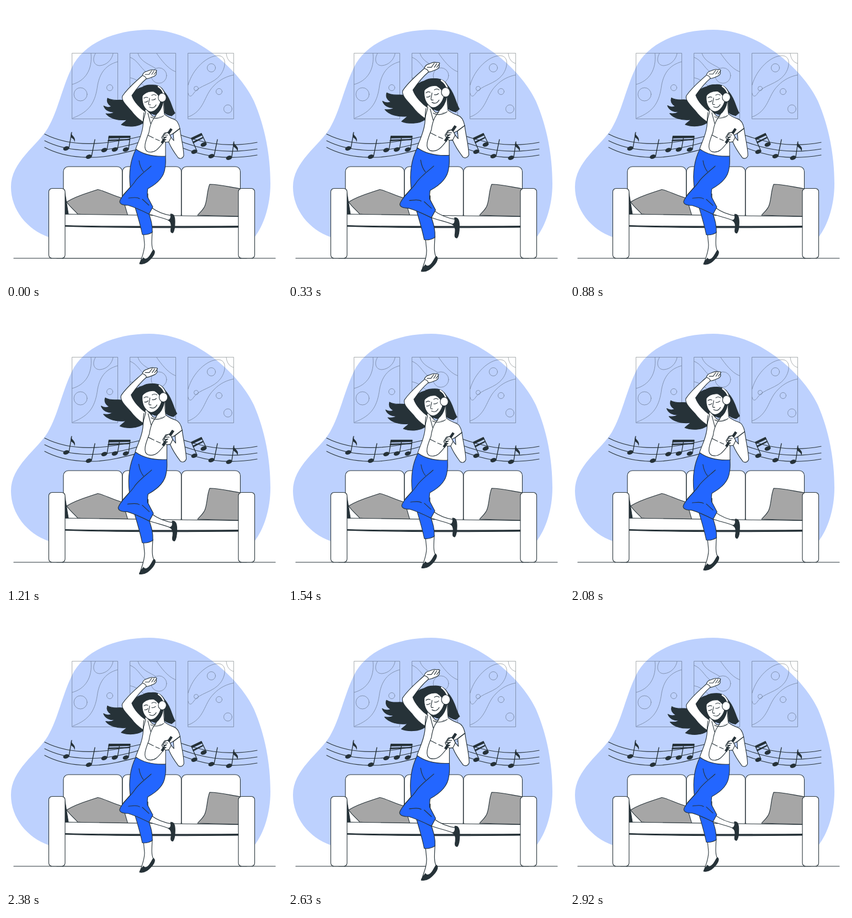
Animation of 500 by 500 pixels, one loop 2.96 s. Source, as an HTML page:

```html
<!DOCTYPE html>
<html lang="en">
<head>
<meta charset="utf-8">
<title>Dancing at home</title>
<style>
  html, body { margin: 0; height: 100%; overflow: hidden; background: #fff; }
  svg { display: block; width: 100%; height: 100%; }
  .line { fill: none; stroke: #263238; stroke-width: 1.1; stroke-linecap: round; stroke-linejoin: round; }
  .white { fill: #fff; }
  .dark { fill: #263238; }
  .blue { fill: #2366ff; }
  .grey { fill: #a6a6a6; }
  .art { stroke-width: .8; opacity: .5; }
</style>
</head>
<body>
<svg viewBox="0 0 500 500">
  <path fill="#bdd1fe" d="M260 43C196 43 140 68 119 112C101 150 94 190 76 221C56 254 9 282 9 328C9 369 38 405 78 419H450C467 398 479 361 479 322C479 270 469 218 449 172C427 123 348 43 260 43Z"/>

  <g class="line art">
    <path d="M120 85.500H202.500V204.500H120ZM225 85.500H307.500V204.500H225ZM330 85.500H412.500V204.500H330Z"/>
    <path d="M154 86C157 116 143 136 120 142M162 86C155 98 160 108 170 108C183 107 192 97 194 86M202 101C180 107 170 122 166 143C162 173 153 191 121 203"/>
    <circle cx="135" cy="160" r="12"/><circle cx="188" cy="148" r="5.500"/>
    <path d="M225 93C238 98 243 111 253 119M239 86C244 102 263 107 271 113M273 86C280 96 293 114 307 119M225 130C243 133 252 150 270 160S298 190 307 194"/>
    <circle cx="277" cy="126" r="14"/>
    <path d="M330 143C338 114 364 90 384 90C400 90 399 110 389 124C376 142 350 143 340 158C335 166 331 164 330 158M399 86C400 96 405 102 412 104M330 201C360 190 358 163 376 145C388 132 402 127 412 125"/>
    <circle cx="372" cy="112" r="7.500"/><circle cx="344.500" cy="149.500" r="4"/><circle cx="386" cy="155" r="5.500"/><circle cx="402" cy="186.500" r="7.500"/>
  </g>

  <g class="line">
    <path d="M70 232C113 254 164 251 200 245S234 238 250 235M70 244C111 265 164 264 200 257S234 249 250 244M70 256C111 278 164 277 200 269S234 261 250 255"/>
    <path d="M306 230C350 247 397 258 455 247M308 242C352 260 397 269 455 259M312 254C354 272 397 280 455 270"/>
    <path stroke-width="1.400" d="M114 257L119 229M155 272L161 242M183 260L187 236M202 259L206 236M222 259L225 236M346 263L336 240M363 250L354 231M377 271L383 242M409 273L413 246"/>
  </g>
  <g class="dark">
    <path d="M118 228C118 236 128 237 124 247C124 240 119 240 117 237ZM412 245C413 253 424 254 419 264C419 257 413 257 411 253ZM186 235L225 235V239L185 240ZM185 242L224 241V243L184 245ZM335 239L354 230L356 234L337 243ZM338 246L357 237L358 239L339 249Z"/>
    <g id="heads"></g>
  </g>

  <path class="line" d="M14 457H488"/>
  <g class="line">
    <path class="white" d="M92 370H436V457H92Z"/>
    <rect class="white" x="104" y="291" width="106.500" height="95" rx="9"/>
    <rect class="white" x="211" y="291" width="106.500" height="95" rx="9"/>
    <rect class="white" x="318" y="291" width="106.500" height="95" rx="9"/>
    <path class="dark" d="M106 333L113 377H106Z"/>
    <path class="grey" d="M110 355C129 343 148 339 166 332.500C171 332 193 343 210 348C215 356 217 369 221 380C184 382 150 379 130 377C123 369 115 363 110 355Z"/>
    <path class="grey" d="M369 323C387 323 405 328 424 331V381L347 379C353 372 359 368 361 360C365 348 364 335 369 323Z"/>
    <path class="white" d="M106 377L422 381.500V399H106Z"/>
    <path class="dark" d="M106 397.500C185 400 330 400 422 398.500V401C330 402 186 402 106 399Z"/>
    <rect class="white" x="77.500" y="330.500" width="29.500" height="126.500" rx="6"/>
    <rect class="white" x="421" y="330.500" width="29.500" height="126.500" rx="6"/>
  </g>

  <g id="girl" class="line">
    <!-- hair behind -->
    <path class="dark" d="M247 147C260 139 279 144 289 158C299 171 300 184 306 194L300 199C293 198 288 195 283 190L252 198L249 211C239 220 219 219 209 215C213 211 217 209 219 206C204 208 188 204 181 195C188 196 193 195 197 192C188 193 180 189 177 181C182 184 187 184 191 182C184 178 182 173 184 167C194 173 204 169 214 171L226 161C232 154 239 149 247 147Z"/>
    <!-- standing leg -->
    <path class="white" d="M249 411L251 432C251 443 248 450 244 462L255 462L267 443C263 436 264 425 265 408Z"/>
    <path class="dark" d="M242 467C243 462 247 459 249 456C252 461 258 457 262 450C264 447 265 444 267 442C271 444 269 450 265 455C259 462 252 469 242 467Z"/>
    <path class="blue" d="M230 352C236 372 242 390 247 414C254 415 260 413 265 410C266 395 261 383 257 370V340Z"/>
    <!-- bent leg -->
    <path class="white" d="M262 364C275 374 287 378 301 380L299 390C285 383 272 382 257 376Z"/>
    <path class="dark" d="M298 377C304 376 306 382 306 391C306 400 305 408 302 411C298 411 298 407 299 402C300 395 298 390 294 388C299 387 299 382 298 377Z"/>
    <path class="blue" d="M235 260C225 280 222 302 225 328C218 337 208 346 206 354C206 360 213 361 221 361C235 365 247 371 259 377L266 364L256 345C256 340 256 335 257 331C270 324 286 313 288 294C290 285 289 278 289 271Z"/>
    <path d="M263 290C253 299 239 309 233 319C226 329 216 337 212 343M241 280C242 287 244 294 249 300M222 348C227 348 236 345 242 349M247 350L259 361"/>
    <!-- shirt and neck -->
    <path class="white" d="M253 186C250 194 249 206 248 218C246 235 239 246 235 259C250 270 270 273 289 272L289 238L303 231L315 222C313 212 310 207 304 205C298 203 292 200 287 196L279 200L266 200Z"/>
    <path d="M262 201C268 205 281 204 287 197"/>
    <path class="white" stroke="none" d="M268 186L286 174L287 198L272 202Z"/>
    <path d="M286 174C285 183 286 190 287 196"/>
    <!-- raised arm -->
    <path class="white" d="M253 192C244 186 232 174 228 162C235 152 243 141 254 132C259 132 264 129 269 127C272 125 273 122 272 119L273 117C271 115 269 116 267 116C263 114 259 117 256 118C251 119 248 122 247 126C234 138 221 148 211 163C208 171 219 181 227 190C235 201 242 206 248 210Z"/>
    <path d="M254 132C254 128 250 127 248 126M259 124L264 117M264 124L268 118M268 124L272 119M252 124L259 124M250 193C248 202 249 207 248 213"/>
    <!-- head -->
    <path class="dark" d="M261 192C269 192 276 184 279 174L285 173C283 183 279 192 271 197C268 197 264 195 261 192Z"/>
    <path class="white" d="M247 163C246 174 249 184 257 190C266 196 276 186 280 174C281 163 276 158 270 153C263 152 252 154 247 163Z"/>
    <path class="dark" d="M245 165C241 152 252 143 266 143C280 143 287 152 288 162L280 172C279 164 275 159 268 155C259 154 251 157 245 165Z"/>
    <path d="M250 167Q253 164 257 166M264 162Q268 159 272 162M251 174Q254 175 257 172M264 170Q268 171 271 168M260 167C260 172 257 177 259 179L262 179M260 183Q268 187 272 179"/>
    <path stroke="#fff" stroke-width="2.500" d="M276 146C281 149 285 155 286 160"/>
    <ellipse class="white" cx="283" cy="166" rx="7.200" ry="8"/>
    <!-- cord -->
    <path d="M280 174C279 189 272 197 265 208C261 216 260 221 259 229C253 244 247 260 257 264C270 268 278 256 285 247M257 194L262 213M257 234L267 239M271 241L278 244"/>
    <!-- right arm and phone -->
    <path class="white" d="M315 222C317 239 322 257 322 271C320 277 315 277 312 275C306 267 299 257 295 247L285 244L282 238L287 230L294 229L299 238L304 244L303 231Z"/>
    <path d="M315 222L302 232"/>
    <path class="dark" d="M298 222L301 224L284 249L281 247Z"/>
    <path class="white" d="M284 238L287 232L292 229L296 232L299 238L295 246L289 247L286 244L290 242L285 241L291 237Z"/>
    <path d="M287 234L293 234"/>
  </g>
</svg>
<script>
  const heads = [[109, 258], [150, 273], [178, 261], [197, 260], [217, 260], [341, 264], [358, 251], [372, 272], [404, 275]];
  document.getElementById('heads').innerHTML = heads.map(([x, y]) =>
    `<ellipse rx="5.6" ry="3.7" transform="translate(${x} ${y}) rotate(-18)"/>`).join('');

  const girl = document.getElementById('girl');
  const LOOP = 2960, BEAT = 750;
  // Pulse of one beat: [time in ms, scale]
  const pulse = [[0, 1], [125, 1.002], [333, 1.078], [375, 1.088], [458, 1.064], [667, .994], [750, 1]];

  function scaleAt(t) {
    const i = pulse.findIndex(([time]) => time > t);
    const [t0, s0] = pulse[i - 1], [t1, s1] = pulse[i];
    return s0 + (s1 - s0) * (t - t0) / (t1 - t0);
  }

  function draw() {
    const s = scaleAt(performance.now() % LOOP % BEAT);
    girl.setAttribute('transform', `translate(249.5 291.5) scale(${s}) translate(-249.5 -291.5)`);
    requestAnimationFrame(draw);
  }
  draw();
</script>
</body>
</html>
```
